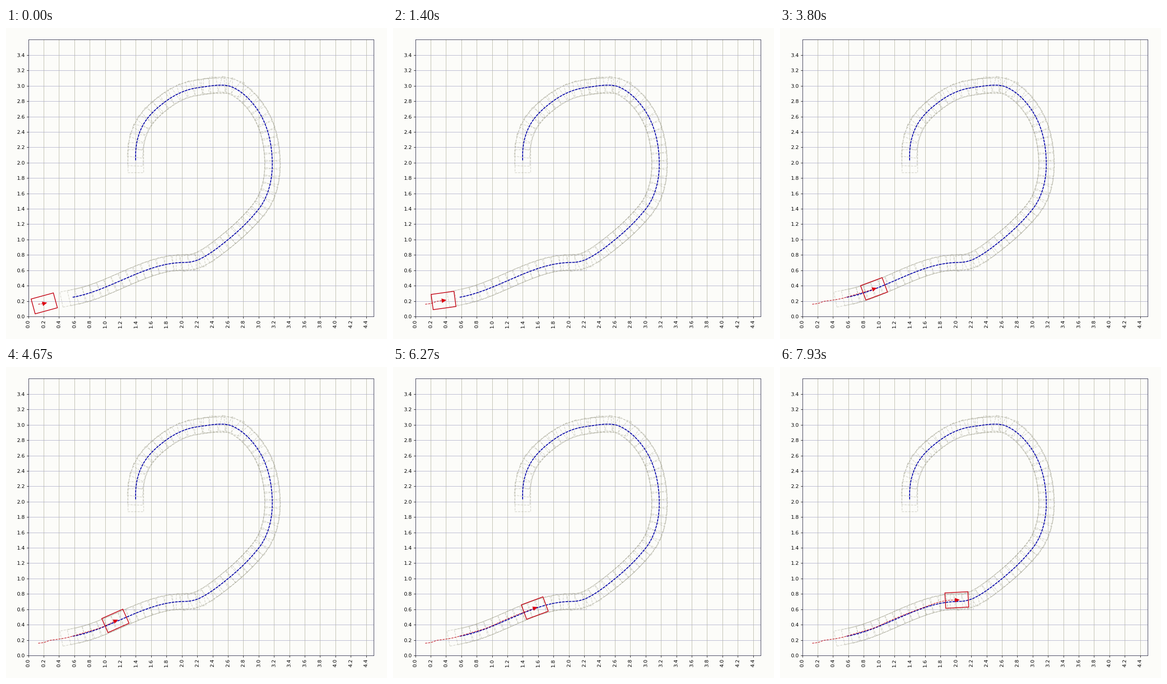
Animation, 829 px wide and 676 px high, one loop 8 s. Source, as a matplotlib script:

```python
import numpy as np
import matplotlib.pyplot as plt
from matplotlib.animation import FuncAnimation
from matplotlib.collections import LineCollection
from matplotlib.patches import Polygon

W, H, DPI = 829, 676, 80
LOOP, FRAMES = 8000, 120
SCALE, LEFT, BOTTOM = 167.1, 48.5, 627.0   # pixels per unit, axes origin
XMAX, YMAX = 4.5, 3.6
CAR_L, CAR_W = 0.3, 0.2


def hermite(u, a, b, ta, tb):
    """Cubic from a to b with end tangents ta and tb."""
    return ((1 + 2 * u) * (1 - u) ** 2 * a + u * (1 - u) ** 2 * ta
            + u * u * (3 - 2 * u) * b + u * u * (u - 1) * tb)


def plan(poses, step):
    """Points and headings along smooth arcs through (x, y, degrees) poses."""
    parts = []
    for (x0, y0, d0), (x1, y1, d1) in zip(poses, poses[1:]):
        chord = np.hypot(x1 - x0, y1 - y0)
        u = np.linspace(0, 1, max(2, round(chord / step) + 1))[:-1]
        a, b = np.radians([d0, d1])
        parts.append(np.c_[hermite(u, x0, x1, chord * np.cos(a), chord * np.cos(b)),
                           hermite(u, y0, y1, chord * np.sin(a), chord * np.sin(b))])
    x, y = np.vstack(parts + [[poses[-1][:2]]]).T
    return x, y, np.arctan2(np.gradient(y), np.gradient(x))


def place(shape, x, y, angle):
    c, s = np.cos(angle), np.sin(angle)
    return shape @ np.array([[c, s], [-s, c]]) + [x, y]


BOX = np.array([[-1, -1], [1, -1], [1, 1], [-1, 1], [-1, -1]]) * [CAR_L / 2, CAR_W / 2]
HEAD = np.array([[6.5, 0], [-4, 4.8], [-4, -4.8]]) / SCALE

# planned route: x, y, heading in degrees
POSES = [(0.578, 0.25, 10), (2.033, 0.702, 0), (2.249, 0.754, 27), (2.602, 1.0, 39),
         (3.003, 1.401, 52), (3.177, 1.976, 90), (3.015, 2.641, 121),
         (2.644, 2.988, 158), (2.506, 3.009, 180), (2.213, 2.976, 187),
         (1.799, 2.805, 216), (1.524, 2.539, 236), (1.398, 2.108, 270),
         (1.398, 2.024, 270)]

# driven path: time in ms, x, y
KEYS = np.array([(-900, 0.129, 0.159), (0, 0.208, 0.170), (800, 0.289, 0.198),
                 (1400, 0.368, 0.208), (2270, 0.526, 0.237), (3000, 0.716, 0.293),
                 (3800, 0.934, 0.359), (4670, 1.135, 0.450), (6270, 1.557, 0.617),
                 (7000, 1.763, 0.689), (7500, 1.901, 0.717), (8000, 2.053, 0.722)])
SPEED = np.gradient(KEYS[:, 1:], KEYS[:, 0], axis=0)


def position(t):
    t = np.clip(np.atleast_1d(t), KEYS[0, 0], LOOP)
    i = np.clip(np.searchsorted(KEYS[:, 0], t, side="right") - 1, 0, len(KEYS) - 2)
    span = (KEYS[i + 1, 0] - KEYS[i, 0])[:, None]
    u = (t - KEYS[i, 0])[:, None] / span
    return hermite(u, KEYS[i, 1:], KEYS[i + 1, 1:], span * SPEED[i], span * SPEED[i + 1])


def heading(t, window=500):
    before, after = position([t - window, t + window])
    return np.arctan2(*(after - before)[::-1])


plt.rcParams.update({"font.family": "DejaVu Sans", "font.size": 10,
                     "axes.edgecolor": "#1c1c3c"})
PAPER = "#fcfcf9"
fig = plt.figure(figsize=((W + 0.01) / DPI, (H + 0.01) / DPI), dpi=DPI, facecolor=PAPER)
ax = fig.add_axes([LEFT / W, 1 - BOTTOM / H, XMAX * SCALE / W, YMAX * SCALE / H],
                  facecolor=PAPER)
ax.set(xlim=(0, XMAX), ylim=(0, YMAX),
       xticks=np.arange(23) * 0.2, yticks=np.arange(18) * 0.2)
ax.xaxis.set_major_formatter("{x:.1f}")
ax.yaxis.set_major_formatter("{x:.1f}")
ax.tick_params(length=3.2, pad=3.4)
ax.tick_params(axis="x", rotation=90)
ax.grid(axis="x", color="#b4b4a2", lw=0.8)
ax.grid(axis="y", color="#acacc8", lw=0.8)

ghosts = [place(BOX, *pose) for pose in zip(*plan(POSES, 0.1))]
ghosts += [place(BOX, x, y, 0) for x, y in [(2.075, 0.7), (2.425, 3.0)]]
ax.add_collection(LineCollection(ghosts, colors="#808068", alpha=0.3,
                                 linewidths=1.2, linestyles="--"))

rx, ry, _ = plan(POSES, 0.02)
ax.plot(rx, ry, color="#0000a8", lw=1.7, ls=(0, (3, 0.9)), zorder=3)

trail, = ax.plot([], [], color="#c01420", lw=1.1, ls="--", zorder=4)
car = Polygon(BOX, closed=True, fill=False, ec="#c40818", lw=1.5, zorder=5)
head = Polygon(HEAD, closed=True, fc="#dc0010", ec="none", zorder=6)
ax.add_patch(car)
ax.add_patch(head)


def update(i):
    t = i * LOOP / FRAMES
    path = position(np.linspace(KEYS[0, 0], t, 150))
    trail.set_data(*path.T)
    pose = (*path[-1], heading(t))
    car.set_xy(place(BOX, *pose))
    head.set_xy(place(HEAD, *pose))
    return trail, car, head


anim = FuncAnimation(fig, update, frames=FRAMES, interval=LOOP / FRAMES,
                     init_func=lambda: update(0), repeat=True, repeat_delay=0)
plt.show()
```
